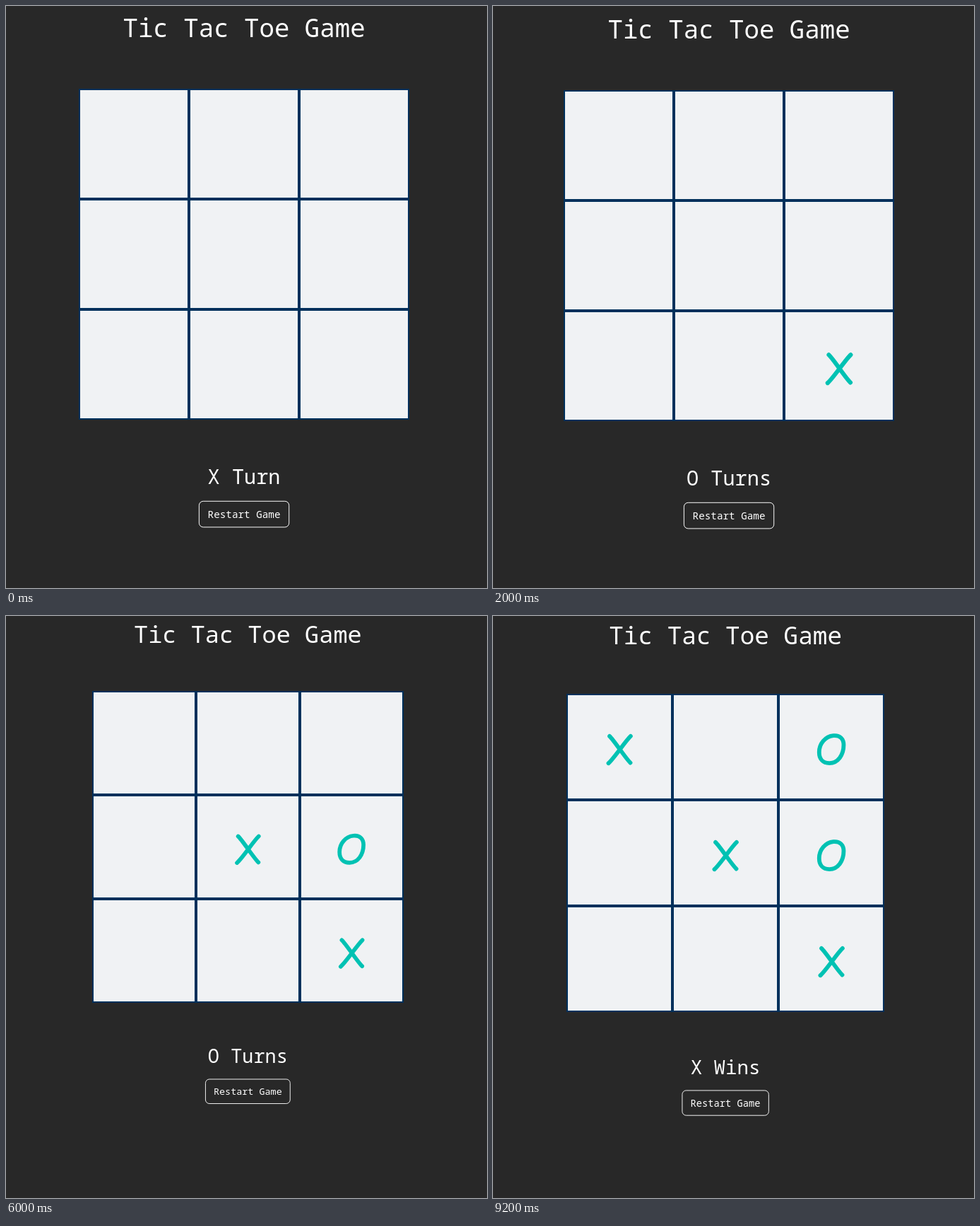
Write an HTML page that moves like this. It is 681x823 px and loops after 10000 ms.

```html
<!DOCTYPE html>
<html lang="en">
<head>
<meta charset="utf-8">
<title>Tic Tac Toe Game</title>
<style>
html, body { margin: 0; width: 100%; height: 100%; overflow: hidden; background: #282828; }
svg { display: block; width: 681px; height: 823px; }
text { font-family: "Noto Sans Mono", "DejaVu Sans Mono", monospace; fill: #fff; text-anchor: middle; }
rect { shape-rendering: crispEdges; }
.board { fill: #01305b; }
.cell { fill: #f0f2f4; }
.button { fill: none; stroke: #fff; shape-rendering: auto; }
.mark { fill: none; stroke: #00c2b3; stroke-width: 6.2; stroke-linecap: round; stroke-linejoin: round; }
</style>
</head>
<body>
<svg viewBox="0 0 681 823">
  <g id="game">
    <rect class="board" x="-2" y="-2" width="480" height="480"/>
    <g id="cells"></g>
    <g id="marks"></g>
    <text x="238" y="-76.5" font-size="36.67">Tic Tac Toe Game</text>
    <text id="status" x="238" y="571.5" font-size="29.33"></text>
    <rect class="button" x="172.7" y="596.2" width="130.6" height="37.6" rx="6"/>
    <text x="238" y="620.5" font-size="14.67" font-weight="500">Restart Game</text>
  </g>
</svg>
<script>
const STEP = 2000, PITCH = 160, SIZE = 156;
const SHAPES = {
  X: 'M-15 -16.2C-9 -11 9 17 16.4 24M16.8 -16.2C9 -9 -8 17 -16.7 24.7',
  O: 'M3 -17C13 -18 18.5 -12 18.5 -3C18.5 12 10 24.5 -3 24.5C-13 24.5 -18.5 18 -18.5 8C-18.5 -5 -9 -16 3 -17Z'
};
// Board position, zoom, status line and cells read row by row
const states = [
  { x: 105, y: 119, zoom: 0.975, status: 'X Turn', cells: '.........' },
  { x: 102, y: 121, zoom: 0.975, status: 'O Turns', cells: '........X' },
  { x: 114, y: 114, zoom: 0.925, status: 'X Turns', cells: '.....O..X' },
  { x: 124, y: 108, zoom: 0.9175, status: 'O Turns', cells: '....XO..X' },
  { x: 106, y: 112, zoom: 0.9375, status: 'X Wins', cells: 'X.O.XO..X' }
];

const byId = id => document.getElementById(id);
const game = byId('game'), marks = byId('marks'), status = byId('status');

function add(parent, tag, attrs) {
  const node = document.createElementNS('http://www.w3.org/2000/svg', tag);
  for (const key in attrs) node.setAttribute(key, attrs[key]);
  parent.append(node);
}

const corner = i => [i % 3 * PITCH, Math.floor(i / 3) * PITCH];

for (let i = 0; i < 9; i++) {
  const [x, y] = corner(i);
  add(byId('cells'), 'rect', { class: 'cell', x, y, width: SIZE, height: SIZE });
}

function show(state) {
  game.setAttribute('transform', `translate(${state.x} ${state.y}) scale(${state.zoom})`);
  status.textContent = state.status;
  marks.replaceChildren();
  [...state.cells].forEach((mark, i) => {
    if (!SHAPES[mark]) return;
    const [x, y] = corner(i);
    add(marks, 'path', {
      class: 'mark', d: SHAPES[mark],
      transform: `translate(${x + SIZE / 2} ${y + SIZE / 2})`
    });
  });
}

let current = 0;
const start = performance.now();
show(states[0]);

function tick() {
  const elapsed = performance.now() - start;
  const index = Math.floor(elapsed / STEP) % states.length;
  if (index !== current) show(states[current = index]);
  requestAnimationFrame(tick);
}
requestAnimationFrame(tick);
</script>
</body>
</html>
```
